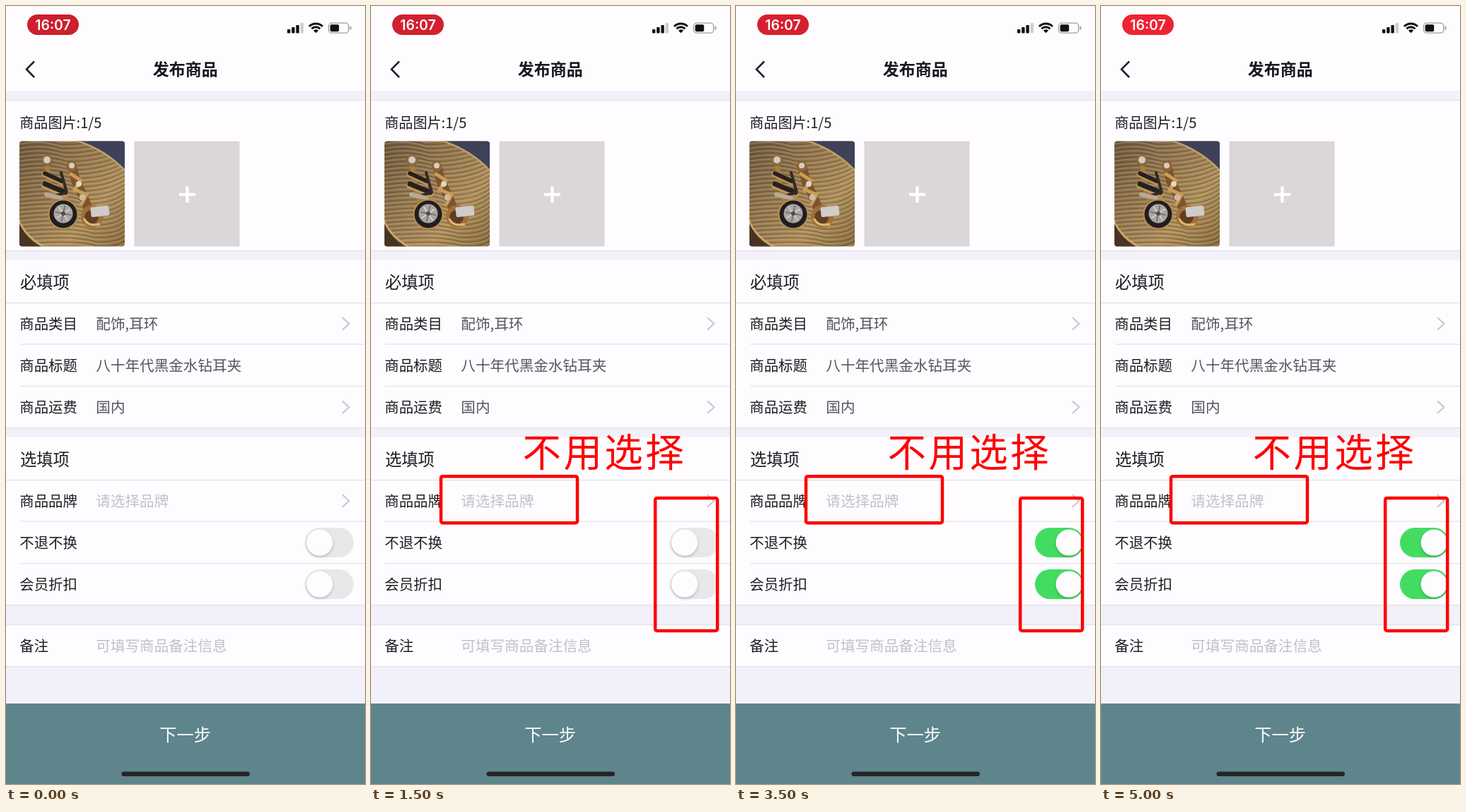
Recreate the animation shown at these times as an HTML page with a canvas. Size 508 by 1102 pixels, loop 5.1 s.

```html
<!DOCTYPE html>
<html lang="zh-CN">
<head>
<meta charset="utf-8">
<title>发布商品</title>
<style>
html, body { margin: 0; width: 100%; height: 100%; overflow: hidden; background: #fefcff; }
canvas { display: block; width: 508px; height: 1102px; }
</style>
</head>
<body>
<canvas id="stage"></canvas>
<script>
const W = 508, H = 1102, LOOP = 5100, STEP = 100;
const canvas = document.getElementById('stage');
const ctx = canvas.getContext('2d');
const dpr = window.devicePixelRatio || 1;
canvas.width = W * dpr;
canvas.height = H * dpr;

const CJK = '"Noto Sans CJK SC", "Noto Sans CJK JP", sans-serif';
const LATIN = 'Inter, Roboto, sans-serif';
const INK = '#1d1c20', VALUE = '#55545a', HINT = '#c2c0c7';
const RED = '#fe0000';

const clamp = v => Math.max(0, Math.min(1, v));
const ease = v => v * v * (3 - 2 * v);
const mix = (a, b, k) => 'rgb(' + a.map((v, i) => Math.round(v + (b[i] - v) * k)) + ')';

function rect(x, y, w, h, color) {
  ctx.fillStyle = color;
  ctx.fillRect(x, y, w, h);
}

function round(x, y, w, h, r, color) {
  ctx.fillStyle = color;
  ctx.beginPath();
  ctx.roundRect(x, y, w, h, r);
  ctx.fill();
}

function frame(x, y, w, h, r, width, color) {
  ctx.strokeStyle = color;
  ctx.lineWidth = width;
  ctx.beginPath();
  ctx.roundRect(x, y, w, h, r);
  ctx.stroke();
}

function disc(x, y, r, color) {
  ctx.fillStyle = color;
  ctx.beginPath();
  ctx.arc(x, y, r, 0, Math.PI * 2);
  ctx.fill();
}

function line(points, width, color) {
  ctx.strokeStyle = color;
  ctx.lineWidth = width;
  ctx.beginPath();
  points.forEach(([x, y]) => ctx.lineTo(x, y));
  ctx.stroke();
}

function curve(x1, y1, cx, cy, x2, y2, width, color) {
  ctx.strokeStyle = color;
  ctx.lineWidth = width;
  ctx.beginPath();
  ctx.moveTo(x1, y1);
  ctx.quadraticCurveTo(cx, cy, x2, y2);
  ctx.stroke();
}

// Text placed by its left edge (or centre) and its vertical middle.
function text(str, x, cy, size, color, { weight = 400, align = 'left', font = CJK, gap = 0 } = {}) {
  ctx.font = `${weight} ${size}px ${font}`;
  ctx.textAlign = align;
  ctx.letterSpacing = gap + 'px';
  ctx.fillStyle = color;
  ctx.fillText(str, x, cy + size * (font === CJK ? 0.38 : 0.364));
}

function statusBar(t) {
  const glow = 0.5 + 0.5 * Math.cos((t - 800) / 2100 * Math.PI * 2);
  round(30, 12, 73, 29, 14.5, mix([200, 31, 44], [239, 34, 50], glow));
  text('16:07', 66.5, 26.7, 19.4, '#fff', { weight: 600, align: 'center', font: LATIN });

  for (let i = 0; i < 4; i++) {
    const h = 5.5 + i * 3;
    round(398 + i * 6.2, 38.5 - h, 4.4, h, 1, i < 3 ? '#111' : '#cfcdd2');
  }

  ctx.lineCap = 'butt';
  ctx.strokeStyle = '#111';
  for (const [r, w] of [[13.2, 3], [8.4, 2.9], [2.5, 5]]) {
    ctx.lineWidth = w;
    ctx.beginPath();
    ctx.arc(438.5, 38.2, r, -Math.PI * 0.755, -Math.PI * 0.245);
    ctx.stroke();
  }

  frame(456.7, 24.2, 28, 14, 4, 1.3, '#9d9ba0');
  round(458.7, 26.2, 12.5, 10, 2, '#111');
  round(486.5, 28.8, 2, 5, 1, '#9d9ba0');
}

// Two fans of ridges on either side of a slanted spine.
function leaf() {
  const tones = [[0, 'rgba(66,46,24,.3)'], [2.4, 'rgba(226,200,146,.24)']];
  for (let i = -4; i < 30; i++) {
    const x = 74 + i * 2.2, y = 190 + i * 6;
    for (const [d, color] of tones) {
      curve(x, y + d, x + 45, y + 2 + d, 172, y - 18 + d, 1.7, color);
      curve(x, y + d, x - 30, y - 10 + d, 15, y - 2 + d, 1.7, color);
    }
  }
}

function photo() {
  ctx.save();
  ctx.beginPath();
  ctx.roundRect(19, 191.5, 149, 149, 4);
  ctx.clip();
  const gold = ctx.createLinearGradient(19, 200, 168, 330);
  gold.addColorStop(0, '#6f5a40');
  gold.addColorStop(0.35, '#927650');
  gold.addColorStop(0.7, '#b0915f');
  gold.addColorStop(1, '#8b6d42');
  rect(19, 191, 150, 150, gold);
  leaf();

  ctx.fillStyle = '#3f4059';
  ctx.beginPath();
  ctx.moveTo(98, 190);
  ctx.quadraticCurveTo(142, 204, 169, 234);
  ctx.lineTo(169, 190);
  ctx.fill();
  curve(98, 190, 142, 204, 169, 234, 2.5, '#bfa06a');

  ctx.fillStyle = '#483426';
  ctx.beginPath();
  ctx.moveTo(18, 306);
  ctx.quadraticCurveTo(28, 330, 52, 342);
  ctx.lineTo(18, 342);
  ctx.fill();
  curve(18, 303, 28, 328, 56, 342, 2.5, '#cda968');

  ctx.lineCap = ctx.lineJoin = 'round';
  // Left earring
  line([[58, 222], [61, 247], [69, 279]], 7, '#a57c42');
  disc(58, 219, 8, '#8d6839');
  disc(58, 218, 5, '#cfcdca');
  line([[55, 238], [79, 249]], 9, '#c09556');
  line([[55, 237], [79, 248]], 6, '#252020');
  line([[55, 254], [84, 266]], 10, '#c09556');
  line([[55, 252], [84, 264]], 7, '#252020');
  line([[78, 236], [86, 264], [66, 270]], 4, '#332923');
  line([[57, 267], [78, 272]], 6, '#b5aa99');
  disc(81, 295, 21.5, '#b98e50');
  disc(81, 295, 19.5, '#211d20');
  disc(81, 294, 13.5, '#aaa5a0');
  for (let i = 0; i < 8; i++) {
    const a = i * Math.PI / 4 + 0.2;
    line([[81, 294], [81 + 11 * Math.cos(a), 294 + 11 * Math.sin(a)]], 1.4, i % 2 ? '#dedad3' : '#696366');
  }
  disc(81, 294, 3, '#53494a');

  // Right earring
  line([[94, 228], [99, 249], [109, 269], [122, 301]], 13, '#7d542b');
  line([[92, 238], [106, 247], [97, 260], [114, 267], [107, 280]], 5, '#c99d57');
  disc(93, 227, 7.5, '#916536');
  disc(93, 226, 4, '#d3cfc8');
  disc(103, 252, 4, '#ded6c6');
  disc(108, 271, 4.5, '#c8bca8');
  disc(122, 298, 16, '#a0703a');
  disc(121, 299, 10, '#623d24');
  curve(111, 302, 117, 313, 132, 309, 3, '#e0b872');
  ctx.translate(132, 291);
  ctx.rotate(-0.1);
  round(-12, -7, 26, 14, 2, '#cfccc9');
  ctx.restore();
}

function addTile() {
  rect(181.5, 191.5, 149, 149, '#dad6da');
  ctx.lineCap = 'butt';
  line([[245, 267], [268, 267]], 4.2, '#fff');
  line([[256.5, 255.5], [256.5, 278.5]], 4.2, '#fff');
}

function row(cy, label, value, color, arrow) {
  text(label, 19.3, cy, 20.4, INK);
  if (value) text(value, 127.3, cy, 20.6, color);
  if (arrow) {
    ctx.lineCap = 'butt';
    ctx.lineJoin = 'miter';
    line([[476, cy - 8.7], [485.5, cy], [476, cy + 8.7]], 2.2, '#cbc9ce');
  }
}

function toggle(cy, on) {
  round(423, cy - 21, 69, 42, 21, mix([234, 231, 235], [66, 221, 96], on ** 3));
  ctx.save();
  ctx.shadowColor = 'rgba(0,0,0,.2)';
  ctx.shadowBlur = 4 * dpr;
  ctx.shadowOffsetY = 2 * dpr;
  disc(443.7 + 27.5 * on, cy, 18.6, '#fefcff');
  ctx.restore();
}

function form(t) {
  rect(0, 0, W, H, '#fefcff');
  for (const [y, h] of [[120, 13], [347, 13], [598, 13], [849, 27], [936, 52]]) rect(0, y, W, h, '#f2f1f9');
  for (const y of [133, 346, 420, 597, 671, 848, 876, 935]) rect(0, y, W, 1.2, '#e1dfe4');
  for (const y of [478.5, 538, 729.5, 789]) rect(20, y, W - 20, 1.2, '#e4e2e7');

  statusBar(t);
  ctx.lineCap = 'butt';
  ctx.lineJoin = 'miter';
  line([[40, 78.5], [29, 89.7], [40, 101]], 2.6, '#222126');
  text('发布商品', 253.7, 89.6, 23, '#18171b', { weight: 600, align: 'center' });

  text('商品图片:1/5', 19.2, 165.7, 20.1, INK);
  photo();
  addTile();

  text('必填项', 20, 391, 23.3, INK);
  row(450, '商品类目', '配饰,耳环', VALUE, true);
  row(509, '商品标题', '八十年代黑金水钻耳夹', VALUE);
  row(568.3, '商品运费', '国内', VALUE, true);

  text('选填项', 20, 642, 23.3, INK);
  row(701, '商品品牌', '请选择品牌', HINT, true);
  row(760, '不退不换');
  row(819.5, '会员折扣');
  toggle(760, ease(clamp((t - 1800) / 300)));
  toggle(819, ease(clamp((t - 2200) / 300)));

  row(906, '备注', '可填写商品备注信息', HINT);

  rect(0, 988, W, 114, '#5e858c');
  text('下一步', 253.7, 1031.7, 24.3, '#fff', { align: 'center' });
  round(163.5, 1084.5, 181.5, 6.5, 3.25, '#252527');
}

function notes(t) {
  if (t >= 700) {
    text('不用选择', 214.5, 631, 54.5, RED, { weight: 500, gap: 3.4 });
    frame(99, 666.2, 193, 66, 2.5, 4.5, RED);
  }
  if (t >= 1400) frame(402.2, 697, 88, 188, 2.5, 4.5, RED);
}

function draw(now) {
  const t = Math.floor((now % LOOP) / STEP) * STEP;
  ctx.setTransform(dpr, 0, 0, dpr, 0, 0);
  form(t);
  notes(t);
}

const start = performance.now();
function tick() {
  draw(performance.now() - start);
  requestAnimationFrame(tick);
}
tick();
</script>
</body>
</html>
```
